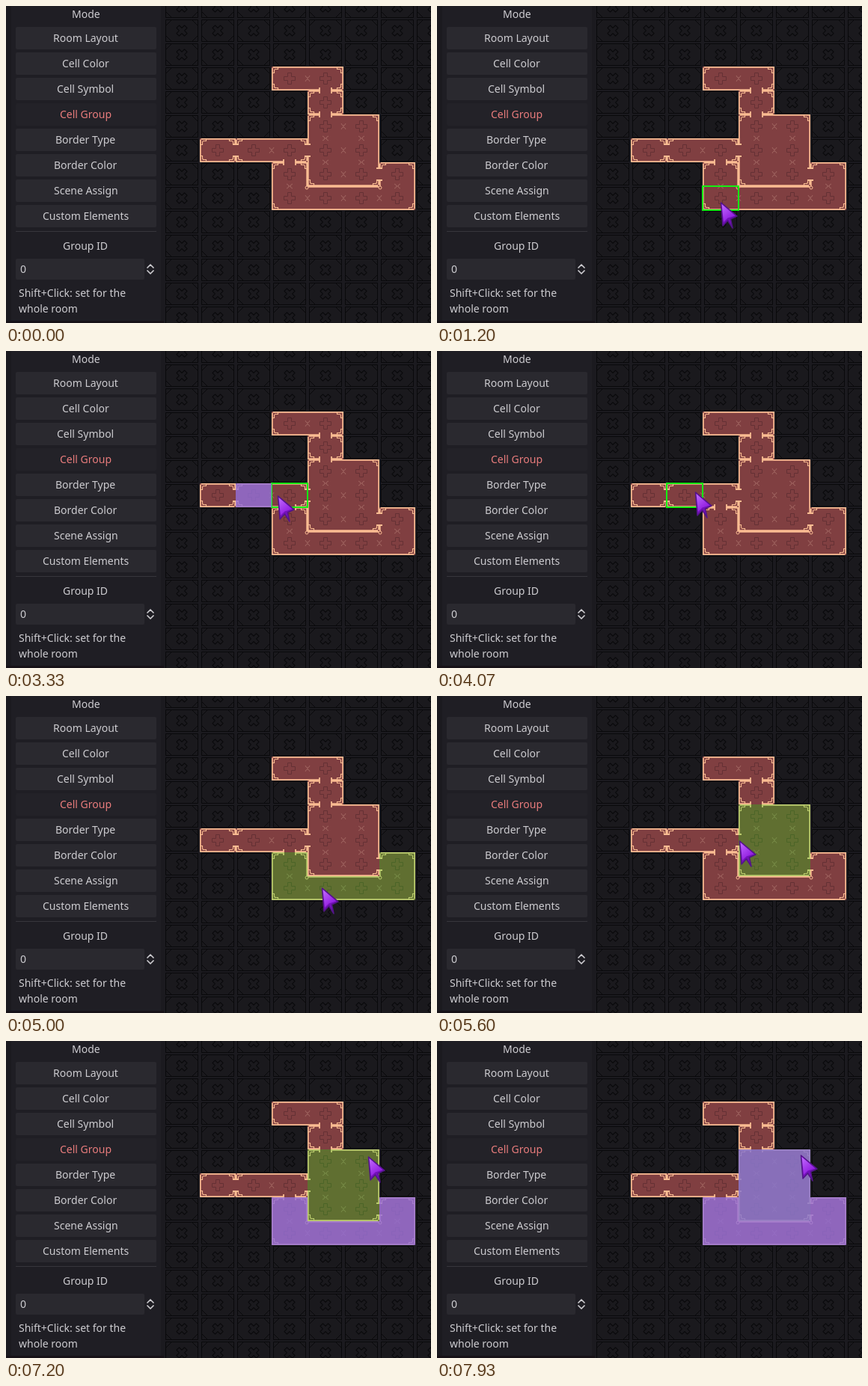
An HTML page for the animation above (8000 ms loop, 568 px wide and 424 px high).

```html
<!DOCTYPE html>
<html lang="en">
<head>
<meta charset="utf-8">
<title>Cell group editor</title>
<style>
html, body { margin: 0; width: 100%; height: 100%; overflow: hidden; background: #1b1a1f; }
svg { display: block; width: 568px; height: 424px; }
text { font: 14px "Noto Sans", sans-serif; fill: #cdccd0; white-space: pre; }
</style>
</head>
<body>
<svg id="stage" viewBox="0 0 568 424" xmlns="http://www.w3.org/2000/svg"></svg>
<script>
const W = 48, H = 32, LEFT = 211, TOP = 17;
const LOOP = 8000, FPS = 15;
const PEACH = '#fbbc92', ROOM = '#803f41', BUTTON = '#2a292f';

// One letter per cell; the map starts at row 2.
const MAP = ['...AA..', '....B..', '....EE.', '.CDDEE.', '...FEEF', '...FFFF'];
const roomAt = (c, r) => ((MAP[r - 2] || '')[c] || '').replace('.', '');
const cellX = c => LEFT + c * W;
const cellY = r => TOP + r * H;

const cells = MAP.flatMap((row, i) => [...row].map((id, c) => ({ c, r: i + 2, id })))
  .filter(k => k.id !== '.');
const cellPath = (c, r) => `M${cellX(c)} ${cellY(r)}h${W}v${H}h${-W}z`;
const roomPath = id => cells.filter(k => k.id === id).map(k => cellPath(k.c, k.r)).join('');

const rect = (x, y, w, h, fill, more = '') =>
  `<rect x="${x}" y="${y}" width="${w}" height="${h}" fill="${fill}" ${more}/>`;
const text = (x, y, s, more = '') => `<text x="${x}" y="${y}" ${more}>${s}</text>`;
const centred = (y, s, more = '') => text(0, y, s, 'class="mid" ' + more);

function panel() {
  const modes = ['Room Layout', 'Cell Color', 'Cell Symbol', 'Cell Group',
    'Border Type', 'Border Color', 'Scene Assign', 'Custom Elements'];
  let s = rect(0, 0, 211, 424, '#1b1a1f') + rect(7, 0, 200, 424, '#1f1e24') + centred(16, 'Mode');
  modes.forEach((name, i) => {
    const on = name === 'Cell Group';
    s += rect(13, 28 + i * 34, 188, 30, on ? '#232228' : BUTTON, 'rx="2"') +
      centred(48 + i * 34, name, on ? 'style="fill:#e87c7c"' : '');
  });
  return s + rect(13, 301, 188, 1, '#37363c') + centred(326, 'Group ID') +
    rect(13, 338, 172, 28, BUTTON, 'rx="2"') + text(19, 357, '0') +
    '<path d="M189 350l4-4 4 4M189 354l4 4 4-4" fill="none" stroke="#cdccd0" stroke-width="1.7" stroke-linecap="round" stroke-linejoin="round"/>' +
    text(17, 389, 'Shift+Click: set for the') + text(17, 410, 'whole room') +
    rect(0, 421, 211, 3, '#171217');
}

function emptyGrid() {
  let s = '';
  for (let r = -1; r < 13; r++) for (let c = 0; c < 8; c++)
    s += `<use href="#empty" x="${cellX(c)}" y="${cellY(r)}"/>`;
  return s;
}

// One door per pair of rooms, side walls first.
function doors() {
  const joined = new Set();
  let s = '';
  for (const [dx, dy] of [[1, 0], [0, 1]]) for (const { c, r, id } of cells) {
    const next = roomAt(c + dx, r + dy), pair = id + next;
    if (!(id < next) || joined.has(pair)) continue;
    joined.add(pair);
    const x = cellX(c) + 24 * (1 + dx), y = cellY(r) + 16 * (1 + dy);
    s += `<use href="#door" transform="translate(${x} ${y}) rotate(${dx * 90})"/>`;
  }
  return s;
}

function rooms() {
  let base = '', marks = '', lines = '', curls = '';
  for (const { c, r, id } of cells) {
    const x = cellX(c), y = cellY(r), same = (dx, dy) => roomAt(c + dx, r + dy) === id;
    base += cellPath(c, r);
    marks += `<use href="#plus" x="${x + 24}" y="${y + 16}"/>`;
    if (same(1, 0)) marks += `<use href="#link" x="${x + W}" y="${y + 16}"/>`;
    if (same(0, 1)) marks += `<use href="#link" transform="translate(${x + 24} ${y + H}) rotate(90)"/>`;
    for (const s of [-1, 1]) {
      const px = x + (s > 0 ? W : 0), py = y + (s > 0 ? H : 0);
      if (!same(s, 0)) lines += `M${px} ${y}v${H}h${-1.7 * s}v${-H}z`;
      if (!same(0, s)) lines += `M${x} ${py}h${W}v${-1.7 * s}h${-W}z`;
      for (const t of [-1, 1]) {
        const qy = y + (t > 0 ? H : 0);
        if (!same(s, 0) && !same(0, t))
          curls += `<use href="#curl" transform="translate(${px} ${qy}) scale(${-s} ${-t})"/>`;
        else if (same(s, 0) && same(0, t) && !same(s, t))
          curls += `<circle cx="${px - s}" cy="${qy - t * 2}" r="2" fill="${ROOM}" stroke="${PEACH}"/>`;
      }
    }
  }
  return `<path d="${base}" fill="${ROOM}"/>${marks}<path d="${lines}" fill="${PEACH}"/>${curls}${doors()}`;
}

const stage = document.getElementById('stage');
stage.innerHTML = `<defs>
  <path id="cross" d="M-2.500-7.500H2.500V-2.500H7.500V2.500H2.500V7.500H-2.500V2.500H-7.500V-2.500H-2.500z" fill="none" stroke-linejoin="round"/>
  <g id="empty" fill="#1a191d" stroke="#09090b">
    <path d="M2.500 1.500h43v29h-43z"/>
    <path d="M10.500 1.500H37.500L45.500 9.500V22.500L37.500 30.500H10.500L2.500 22.500V9.500z"/>
    <use href="#cross" transform="translate(24 16) rotate(45)"/>
  </g>
  <use id="plus" href="#cross" stroke="#643034"/>
  <path id="link" d="M-3-4Q-2-1 0-1Q2-1 3-4M-3 4Q-2 1 0 1Q2 1 3 4M0-1V1" fill="none" stroke="#a06560"/>
  <path id="curl" d="M1 8.500H3.500V5.500Q3.500 3.500 5.500 3.500H8.500V1" fill="none" stroke="${PEACH}" stroke-width="1.1"/>
  <g id="door"><path d="M-8-2H8V2H-8z" fill="${ROOM}"/>
    <path d="M-8-4V4M8-4V4" stroke="${PEACH}" stroke-width="1.8"/></g>
  <linearGradient id="shine" x2=".6" y2="1">
    <stop stop-color="#c26cff"/><stop offset="1" stop-color="#8c14dc"/>
  </linearGradient>
  </defs>
  ${rect(0, 0, 568, 424, '#1b1a1f')}${emptyGrid()}${panel()}${rooms()}
  <path id="hover"/><path id="group" fill="#9370db" fill-opacity=".8"/>
  <g id="cursor" stroke-linejoin="round">
    <path d="M.5 1L3 32L9.500 25L16 35L13.500 23L22 19z" fill="#7411ba" stroke="#531488" stroke-width="1.500"/>
    <path d="M1.500 3L4 27L9.500 21.500L19.500 18.500z" fill="url(#shine)"/>
  </g>`;
const [hover, group, cursor] = ['hover', 'group', 'cursor'].map(id => document.getElementById(id));

// Centred labels start on whole pixels.
for (const label of stage.querySelectorAll('.mid'))
  label.setAttribute('x', Math.round(106.5 - Math.ceil(label.getComputedTextLength()) / 2));

// Cursor moves: [first step, last step, x, y, sag]; it rests in between.
const MOVES = [
  [11, 12, 537, 265], [12, 18, 379, 262, 8], [18, 23, 380, 227], [26, 30, 338, 190],
  [35, 41, 364, 193], [49, 57, 345, 188], [63, 70, 420, 259, 30], [74, 80, 445, 216],
  [82, 85, 390, 185], [88, 92, 386, 240], [100, 101, 441, 208], [101, 104, 515, 138],
  [104, 108, 484, 154], [114, 119, 486, 152]
];
const SHIFT = 70;

// Assigned areas: [path, from step, to step]
const MARKS = [
  [cellPath(2, 5), 36, 61], [cellPath(3, 5), 44, 50],
  [roomPath('F'), 97, 120], [roomPath('E'), 115, 120]
];

const clamp = u => Math.min(1, Math.max(0, u));
const ease = u => u * u * (3 - 2 * u);

function tipAt(step) {
  let x = 0, y = 0;
  for (const [a, b, tx, ty, sag = 0] of MOVES) {
    const u = ease(clamp((step - a) / (b - a)));
    x += (tx - x) * u;
    y += (ty - y) * u + sag * Math.sin(Math.PI * u);
  }
  return [Math.round(x), Math.round(y)];
}

function draw(ms) {
  const step = Math.floor((ms % LOOP + 5) * FPS / 1000) % (LOOP * FPS / 1000);
  const shown = step >= MOVES[0][1];
  cursor.style.display = hover.style.display = shown ? '' : 'none';
  group.setAttribute('d', MARKS.filter(m => step >= m[1] && step < m[2]).map(m => m[0]).join(''));
  if (!shown) return;
  const [x, y] = tipAt(step), whole = step >= SHIFT;
  const c = Math.floor((x - LEFT) / W), r = Math.floor((y - TOP) / H);
  cursor.setAttribute('transform', `translate(${x} ${y})`);
  hover.setAttribute('d', whole ? roomPath(roomAt(c, r)) : cellPath(c, r));
  hover.setAttribute('style', whole ? 'fill:#0f0;fill-opacity:.25' : 'fill:none;stroke:#14f014;stroke-width:2');
}

const start = performance.now();
function tick() {
  draw(performance.now() - start);
  requestAnimationFrame(tick);
}
draw(0);
requestAnimationFrame(tick);
</script>
</body>
</html>
```
